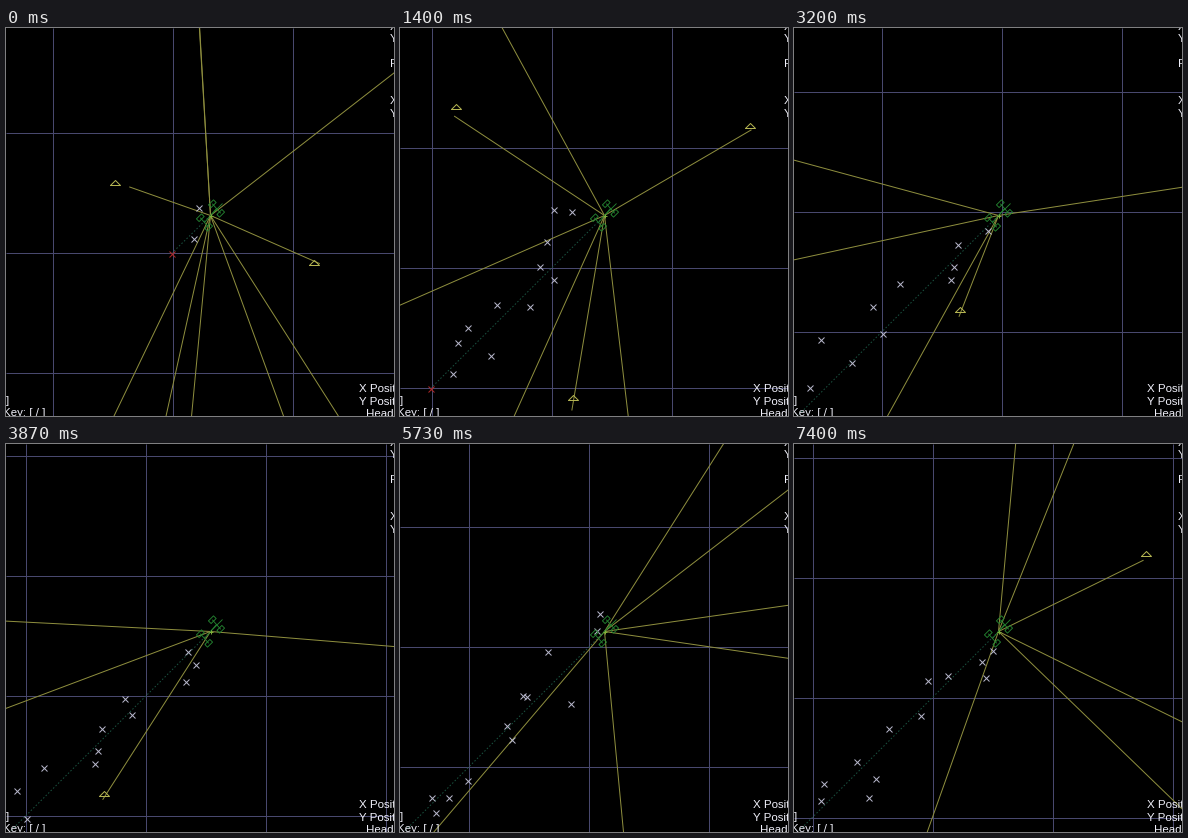
These frames come from a looping animation (388 px wide and 388 px high, 7470 ms). A matplotlib script:

```python
import numpy as np
import matplotlib.pyplot as plt
from matplotlib.animation import FuncAnimation
from matplotlib.collections import LineCollection

SIZE, LOOP_MS, TICK = 388, 7470, 30
STEP = 200 / 3  # the scene advances 15 times a second
STEPS = 112
PX = 0.72       # one pixel in points at 100 dpi
HUB = np.array([204.5, 187.5])
START = np.array([165, 225])
CELL, SENSOR_RANGE = 120, 500

GRID = "#48486e"
RAY = "#8e8e3e"
CONE = "#b4b452"
FIX = "#b8b8cc"
TRAIL = "#1a5240"
ROVER = "#248230"
TEXT = "#f0f0fa"

# Landmarks along the course, in screen pixels at the start
CONES = np.array([
    (109, 155), (308, 235), (191, -56), (485, -37), (803, -180),
    (1101, -639), (190, -216), (185, 405), (397, 507), (-2, 589),
    (122, 589), (359, 609), (1032, -775), (1000, -973),
    (1182, -459), (1202, -321)])
CONE_SHAPE = np.array([(-5, 2), (5, 2), (0, -3), (-5, 2)])


def driven(n):
    """Pixels driven along each axis: steady speed after a soft start."""
    return 6.82 * n - 8.3 * (1 - np.exp(-n / 5))


def to_screen(world, n):
    return np.round(world + driven(n) * np.array([-1, 1])) + 0.5


def make_fixes():
    """A noisy position fix every two and a half steps."""
    rng = np.random.default_rng(7)
    births = np.arange(-4, STEPS, 2.5)
    path = HUB + driven(births)[:, None] * np.array([1, -1])
    return births, path + rng.normal(0, 18, path.shape)


def ray_ends(n):
    """Noisy range and bearing to each cone within reach."""
    rng = np.random.default_rng(500 + n)
    rel = to_screen(CONES, n) - HUB
    dist = np.hypot(*rel.T)
    angle = np.arctan2(rel[:, 1], rel[:, 0]) + rng.normal(0, 0.02, len(rel))
    reach = dist * (1 + rng.normal(0, 0.06, len(rel)))
    ends = HUB + reach[:, None] * np.column_stack([np.cos(angle), np.sin(angle)])
    return ends[dist < SENSOR_RANGE]


def grid_lines(n):
    x0 = np.round(46.4 - driven(n)) % CELL + 0.5
    y0 = np.round(104 + driven(n)) % CELL + 0.5
    cols = [[(x, 0), (x, SIZE)] for x in np.arange(x0, SIZE, CELL)]
    rows = [[(0, y), (SIZE, y)] for y in np.arange(y0, SIZE, CELL)]
    return cols + rows


def rover_lines():
    fwd, side = np.array([6, -7]), np.array([4.2, 4.8])
    u, v = np.array([0.7, -0.7]), np.array([0.7, 0.7])
    box = [(-1, -1), (1, -1), (1, 1), (-1, 1), (-1, -1)]
    lines = [[HUB - fwd, HUB + fwd], [HUB, HUB + (12, -12)]]
    for end in (-1, 1):
        axle = HUB + end * fwd
        lines.append([axle - side, axle + side])
        for s in (-1, 1):
            wheel = axle + s * side
            lines.append([wheel + a * 3.6 * u + b * 1.9 * v for a, b in box])
    return lines


fig = plt.figure(figsize=(SIZE / 100, SIZE / 100), dpi=100, facecolor="black")
ax = fig.add_axes([0, 0, 1, 1])
ax.set(xlim=(0, SIZE), ylim=(SIZE, 0))
ax.axis("off")


def add_lines(color, z, segments=(), width=1.0):
    lines = LineCollection(segments, colors=color, linewidths=width * PX,
                           zorder=z)
    return ax.add_collection(lines, autolim=False)


def add_marks(color, z):
    return ax.plot([], [], "x", color=color, ms=6 * PX, mew=PX, zorder=z)[0]


grid = add_lines(GRID, 1)
trail, = ax.plot([], [], color=TRAIL, lw=PX, ls=(0, (1.5, 2)), zorder=2)
rays = add_lines(RAY, 3)
cones = add_lines(CONE, 4)
origin = add_marks("#b02828", 5)
fixes = add_marks(FIX, 6)
add_lines(ROVER, 7, rover_lines(), 0.9)
add_lines("#7fb03a", 8, [[HUB - (2, 0), HUB + (2, 0)],
                         [HUB - (0, 2), HUB + (0, 2)]])

LABELS = [
    (384, 2, "X"), (384, 14, "Y"), (384, 39, "F"), (384, 76, "X"),
    (384, 89, "Y"), (353, 364, "X Position"), (353, 377, "Y Position"),
    (360, 389, "Heading"), (0, 376, "]"), (-3, 388, "Key: [ / ]"),
]
for x, y, label in LABELS:
    ax.text(x, y, label, color=TEXT, family="Liberation Sans",
            fontsize=11.5 * PX, va="baseline", zorder=9)

FIX_BIRTHS, FIX_PLACES = make_fixes()


def draw(tick):
    n = int((tick * TICK + 24) / STEP)
    start = to_screen(START, n)
    grid.set_segments(grid_lines(n))
    trail.set_data(*np.array([start, HUB]).T)
    origin.set_data(*start[:, None])
    rays.set_segments([[HUB, end] for end in ray_ends(n)])
    cones.set_segments([c + CONE_SHAPE for c in to_screen(CONES, n)])
    fixes.set_data(*to_screen(FIX_PLACES[FIX_BIRTHS <= n], n).T)
    return grid, trail, origin, rays, cones, fixes


anim = FuncAnimation(fig, draw, frames=LOOP_MS // TICK, interval=TICK,
                     repeat=True, repeat_delay=0, blit=False)
plt.show()
```
